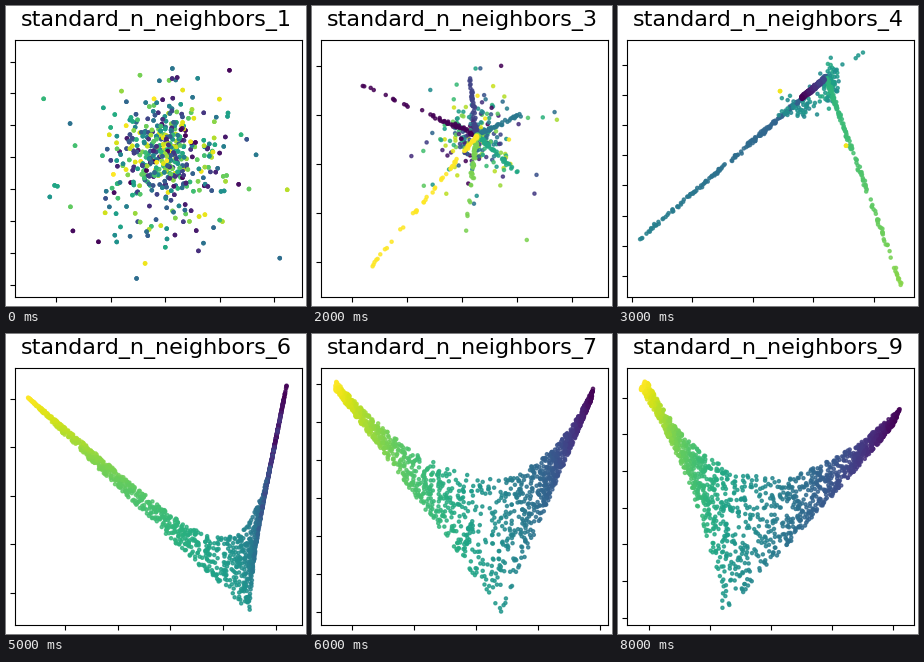
Animation of 300 by 300 pixels, one loop 9000 ms. Source, as a matplotlib script:

```python
from math import comb

import numpy as np
import matplotlib.pyplot as plt
from matplotlib.animation import FuncAnimation
from matplotlib.ticker import NullFormatter

# All shapes are (x, y, tone) rows in stage pixels; tone runs 0..1 on viridis.


def bezier(ctrl, s):
    n = len(ctrl) - 1
    basis = [comb(n, j) * s**j * (1 - s)**(n - j) for j in range(n + 1)]
    return np.array(basis).T @ np.array(ctrl)


def cloud(rng, n, center, spread, tones=(0, 1), df=30):
    """Heavy-tailed blob; a low df throws more points far out."""
    tail = np.sqrt(df / rng.chisquare(df, n))[:, None]
    xy = center + spread * rng.normal(size=(n, 2)) * tail
    inside = np.all((xy > (22, 45)) & (xy < (283, 279)), axis=1)
    return np.c_[xy, rng.uniform(*tones, n)][inside]


def arm(rng, n, start, end, tones, power=2):
    """Thin ray, crowded at its start and reaching its end exactly."""
    u = np.append(rng.uniform(size=n - 1)**power, 1)[:, None]
    a, b = np.array(start), np.array(end)
    xy = a + (b - a) * u + 0.8 * rng.normal(size=(n, 2))
    return np.c_[xy, tones[0] + (tones[1] - tones[0]) * u]


def band(rng, top, dark, light, n=1500, bend=0.53):
    """Sheet between its top edge and two lower edges meeting at the foot."""
    u, v = rng.uniform(size=(2, n))
    s = u - 0.06 * np.sin(2 * np.pi * u)
    low = np.where((s < bend)[:, None],
                   bezier(dark, np.minimum(s / bend, 1)),
                   bezier(light, np.maximum((s - bend) / (1 - bend), 0)))
    xy = bezier(top, s) * (1 - v)[:, None] + low * v[:, None]
    return np.c_[xy, u]


def scattered(rng):
    blob = cloud(rng, 480, (159, 148), (23, 27), df=3.5)
    return np.repeat(blob, 3, axis=0)


def flattened(rng):
    hub = (173, 131)
    return np.repeat(np.vstack([
        cloud(rng, 440, hub, (23, 8), df=3),
        arm(rng, 9, hub, (162, 45), (.8, .85), 0.7),
        arm(rng, 22, hub, (283, 93), (.6, .7), 1),
        arm(rng, 4, hub, (22, 160), (.4, .1), 1),
        arm(rng, 2, hub, (186, 279), (.6, .7)),
    ]), 3, axis=0)


def star(rng):
    hub = (165, 130)
    ends = [bezier([(50, 80), (280, 20), (250, 230), (60, 260)], s)
            for s in np.linspace(0, 1, 6)]
    rays = [arm(rng, 60, hub, e, (t, t)) for e, t in zip(ends, np.linspace(0, 1, 6))]
    return np.vstack([cloud(rng, 250, hub, (15, 15), df=3), *rays])


def two_arms(rng):
    hub = (208, 72)
    return np.vstack([
        arm(rng, 400, hub, (22, 233), (.28, .44), 3),
        cloud(rng, 70, (212, 80), (4.5, 9), (.48, .62)),
        cloud(rng, 45, (182, 101), (10, 7), (.45, .55)),
        arm(rng, 9, hub, (244, 47), (.5, .53), 1),
        arm(rng, 140, hub, (283, 279), (.64, .82), 1.2),
        arm(rng, 300, hub, (184, 92), (.25, 0), 0.6),
        np.repeat([(162, 85.5, .98), (228, 140, .98)], 3, axis=0),
    ])


def corner(rng):
    hub = (238, 215)
    return np.vstack([
        cloud(rng, 300, (236, 228), (10, 14), (.5, .7)),
        arm(rng, 500, hub, (22, 64), (.65, 1), 1.3),
        arm(rng, 500, hub, (283, 46), (.45, 0), 1.3),
    ])


def narrow_fold(rng):
    return band(rng,
                [(282, 45), (262, 140), (245, 290), (200, 205), (22, 64)],
                [(268, 115), (246, 215), (244, 278)],
                [(244, 278), (130, 175), (22, 64)])


def even_fold(rng):
    return band(rng, [(281, 55), (195, 235), (24, 48)],
                [(280, 65), (235, 170), (190, 279)],
                [(190, 279), (110, 170), (22, 55)])


def right_fold(rng):
    return band(rng, [(24, 109), (238, 243), (280, 45)],
                [(22, 112), (148, 208), (257, 279)],
                [(257, 279), (270, 165), (282, 75)])


def left_fold(rng):
    return band(rng, [(282, 75), (122, 224), (28, 46)],
                [(276, 92), (190, 192), (105, 279)],
                [(105, 279), (85, 150), (22, 55)])


# shape, then first tick and tick step along x and y
SCENES = [
    (scattered, (50, 54.6), (56, 31.9)),
    (flattened, (53, 58.6), (74, 55)),
    (star, (40, 55), (60, 49)),
    (two_arms, (14, 60.4), (59, 30.15)),
    (corner, (45, 54), (62, 45)),
    (narrow_fold, (59, 52.7), (65, 48.4)),
    (even_fold, (40, 62), (50, 38)),
    (right_fold, (52, 63), (45, 36.2)),
    (left_fold, (31, 61), (64, 36.6)),
]
shapes = [make(np.random.RandomState(k)) for k, (make, _, _) in enumerate(SCENES)]

fig, ax = plt.subplots(figsize=(3, 3), dpi=100, facecolor="white",
                       constrained_layout=True)
title = fig.suptitle("standard_n_neighbors_1", size=16)


def draw(i):
    _, (x0, dx), (y0, dy) = SCENES[i]
    x, y, tone = shapes[i].T
    ax.clear()
    title.set_text(f"standard_n_neighbors_{i + 1}")
    ax.scatter(x, y, c=tone, s=5, alpha=0.8, cmap="viridis", vmin=0, vmax=1)
    ax.set(xlim=(9, 295.8), ylim=(291, 34),
           xticks=np.arange(x0, 295, dx), yticks=np.arange(y0, 290, dy))
    ax.xaxis.set_major_formatter(NullFormatter())
    ax.yaxis.set_major_formatter(NullFormatter())


anim = FuncAnimation(fig, draw, frames=len(SCENES), interval=1000, repeat=True,
                     repeat_delay=0, blit=False)
plt.show()
```
